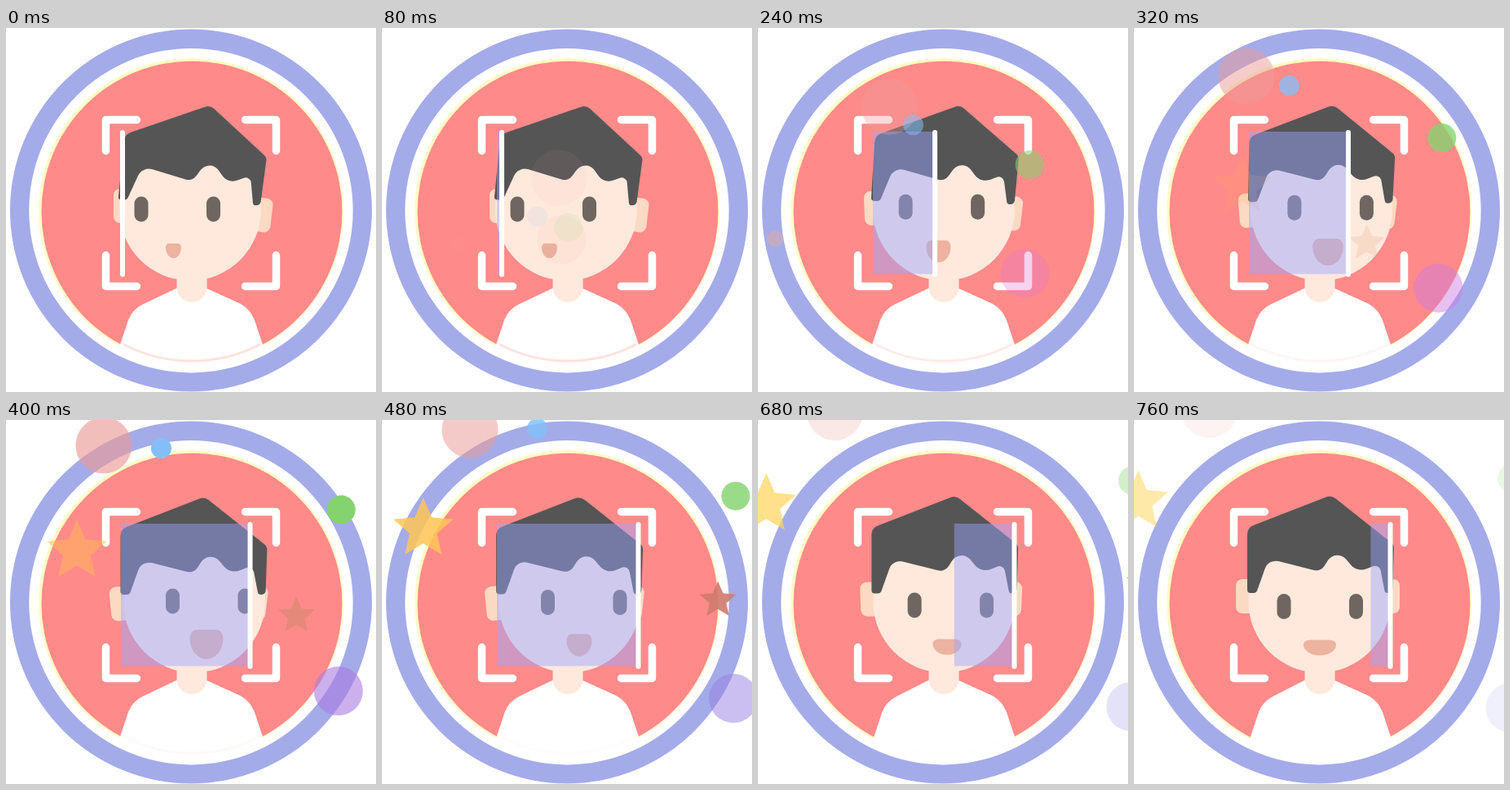
Recreate the animation shown at these times as an HTML page with a canvas. Size 454 px wide and 446 px high, loop 800 ms.

```html
<!DOCTYPE html>
<html lang="en">
<head>
<meta charset="utf-8">
<title>Face scan</title>
<style>
html, body { margin: 0; width: 100%; height: 100%; overflow: hidden; background: #fff; }
canvas { display: block; }
</style>
</head>
<body>
<canvas id="stage" width="454" height="446"></canvas>
<script>
const ctx = document.getElementById('stage').getContext('2d');
const LOOP = 800, STEP = 40, TAU = Math.PI * 2;
const SKIN = '#ffe9dc';

const mix = (a, b, k) => a + (b - a) * k;
const ramp = (t, from, to) => Math.min(1, Math.max(0, (t - from) / (to - from)));
const smooth = (t, from, to) => {
  const k = ramp(t, from, to);
  return k * k * (3 - 2 * k);
};

function disc(x, y, r, color) {
  ctx.fillStyle = color;
  ctx.beginPath();
  ctx.arc(x, y, r, 0, TAU);
  ctx.fill();
}

function pill(x, y, w, h, radii, color) {
  ctx.fillStyle = color;
  ctx.beginPath();
  ctx.roundRect(x - w / 2, y - h / 2, w, h, radii);
  ctx.fill();
}

function star(x, y, r, color) {
  ctx.fillStyle = color;
  ctx.beginPath();
  for (let i = 0; i < 10; i++) {
    const a = i * TAU / 10, d = i % 2 ? r * 0.46 : r;
    ctx.lineTo(x + d * Math.sin(a), y - d * Math.cos(a));
  }
  ctx.fill();
}

function backdrop() {
  disc(227, 223.5, 222, '#a4abe9');
  disc(227, 223.7, 198.7, '#fff');
  disc(227, 224, 187, '#fffcc4');
  disc(228, 225, 184.5, '#ff8a8a');
}

function body(look, home) {
  const d = 3 * (1 - home);
  ctx.save();
  ctx.beginPath();
  ctx.arc(228, 224, 190, 0, TAU);
  ctx.clip();
  ctx.fillStyle = '#fff';
  ctx.fill(new Path2D(`M${135 - d} 415L${143 - d} 388L${153 - d} 358Q${158 - d} 345 ${170 - d} 339
    L209 319H246L288 338Q300 345 305 358L315 388L323 415Z`));
  ctx.restore();
  ctx.strokeStyle = `rgba(255,226,220,${1 - 0.8 * look - 0.2 * home})`;
  ctx.lineWidth = 3;
  ctx.beginPath();
  ctx.arc(228, 225, 183, 1.1, 2.04);
  ctx.stroke();
  pill(228, 310, 37, 52, 18.5, SKIN);
}

function ear(x, y, tilt) {
  ctx.save();
  ctx.translate(x, y);
  ctx.rotate(tilt);
  pill(0, 0, 24, 42, 8, '#fbd9c3');
  ctx.restore();
}

// Corners of the hair seen from the front: x, y, radius
const HAIR = [
  [139, 132, 12], [242, 92, 12], [319, 153, 8], [317, 212, 5], [308, 212, 4], [301, 176, 7],
  [274, 187, 17], [248, 156, 14], [229, 186, 12], [165, 170, 14], [150, 212, 5], [139, 212, 4]
];

function hair(turn, home) {
  ctx.save();
  ctx.translate(228 + 1.5 * (1 - home), 165 + 2 * (1 - home));
  ctx.transform(1 - 0.02 * turn, 0.04 * turn, -0.1 * turn, 1, 0, 0);
  ctx.translate(-228, -165);
  ctx.fillStyle = '#555';
  ctx.beginPath();
  ctx.moveTo(139, 170);
  HAIR.forEach(([x, y, r], i) => {
    const next = HAIR[(i + 1) % HAIR.length];
    ctx.arcTo(x, y, next[0], next[1], r);
  });
  ctx.fill();
  ctx.restore();
}

function mouth(t, look, home) {
  const open = smooth(t, 80, 400), shut = smooth(t, 400, 560), smile = smooth(t, 560, 740);
  const w = 19 + 22 * open - 20 * shut + 19 * smile, h = 18 + 18 * open - 17 * shut;
  const top = { x: w * 0.2, y: h * 0.28 }, bottom = { x: w / 2, y: h * 0.7 };
  pill(205.5 + 40.5 * look - 18 * home, 273 + 2 * look + 4 * home, w, h, [top, top, bottom, bottom], '#ebb3a0');
}

// look: glance to the right; home: slow return to the front
function head(t, look, home) {
  const back = home * home;
  ear(144 - 4 * look - 3 * home, 218 + 7 * look - 9 * back, -0.1 * look * (1 - back));
  ear(314 - 6 * look + 6 * back, 229 - 5 * look - 8 * back, 0.12 * (1 - back));
  disc(226 + 5 * look - 3.5 * home, 222.5, 87, SKIN);
  hair(1 - look, home);
  const eyeX = 166 + 38.5 * look - 20.5 * back;
  const eyeY = 222 - 3 * Math.sin(Math.PI * look) + 6.5 * home;
  for (const x of [eyeX, eyeX + 88.5]) pill(x, eyeY, 17, 31, 8.5, '#6f6661');
  mouth(t, look, home);
}

function brackets() {
  ctx.strokeStyle = '#fff';
  ctx.lineWidth = 9.5;
  ctx.lineCap = 'round';
  ctx.lineJoin = 'round';
  for (const sx of [-1, 1]) for (const sy of [-1, 1]) {
    const x = 227 + sx * 104.5, y = 214.5 + sy * 102;
    ctx.beginPath();
    ctx.moveTo(x - sx * 38, y);
    ctx.lineTo(x, y);
    ctx.lineTo(x, y - sy * 38);
    ctx.stroke();
  }
}

// Dots burst out of the face first, stars follow
const DOTS = { shape: disc, launch: 160, pace: 280, born: 40, full: 400, gone: 840 };
const STARS = { shape: star, launch: 328, pace: 215, born: 280, full: 500, gone: 1000 };
const CONFETTI = [
  { kind: DOTS, from: [189, 140], to: [92, -13], r: 34.5, hue: [2, 2], tone: '66%,76%', alpha: 0.65 },
  { kind: DOTS, from: [190.5, 175], to: [190.5, -22], r: 12.5, hue: [209, 209], tone: '87%,74%', alpha: 1 },
  { kind: DOTS, from: [281, 206], to: [464, 71], r: 17.5, hue: [107, 107], tone: '53%,63%', alpha: 1 },
  { kind: DOTS, from: [274, 280], to: [462, 353], r: 30, hue: [340, 240], tone: '63%,68%', alpha: 0.6 },
  { kind: DOTS, from: [57, 261], to: [-69, 251], r: 10, hue: [18, 18], tone: '77%,75%', alpha: 0.7 },
  { kind: STARS, from: [128, 191], to: [4, 99], r: 38.5, hue: [30, 45], tone: '100%,67%', alpha: 0.95 },
  { kind: STARS, from: [293, 261], to: [484, 197], r: 23.5, hue: [25, 0], tone: '51%,62%', alpha: 1 }
];

function confetti(t) {
  for (const { kind, from, to, r, hue, tone, alpha } of CONFETTI) {
    const flown = 1.025 * Math.tanh((t - kind.launch) / kind.pace);
    const fade = Math.min(ramp(t, kind.born, kind.full), ramp(t, kind.gone, kind.gone - 440));
    ctx.globalAlpha = alpha * fade;
    kind.shape(mix(from[0], to[0], flown), mix(from[1], to[1], flown), r, `hsl(${mix(...hue, flown)},${tone})`);
  }
  ctx.globalAlpha = 1;
}

function scanner(t) {
  const x = mix(143, 314.5, smooth(t, 40, 480));
  const left = mix(141, 312, smooth(t, 480, 840));
  ctx.fillStyle = 'rgba(152,166,255,.465)';
  ctx.fillRect(left, 127, Math.max(0, x - 2 - left), 174.5);
  pill(x, 215, 6, 180, 3, '#fff');
}

function draw(ms) {
  const t = Math.floor(ms % LOOP / STEP) * STEP;
  const look = smooth(t, 120, 400), home = ramp(t, 400, 760);
  ctx.clearRect(0, 0, 454, 446);
  backdrop();
  body(look, home);
  head(t, look, home);
  brackets();
  confetti(t);
  scanner(t);
}

const start = performance.now();
function tick() {
  draw(performance.now() - start);
  requestAnimationFrame(tick);
}
tick();
</script>
</body>
</html>
```
